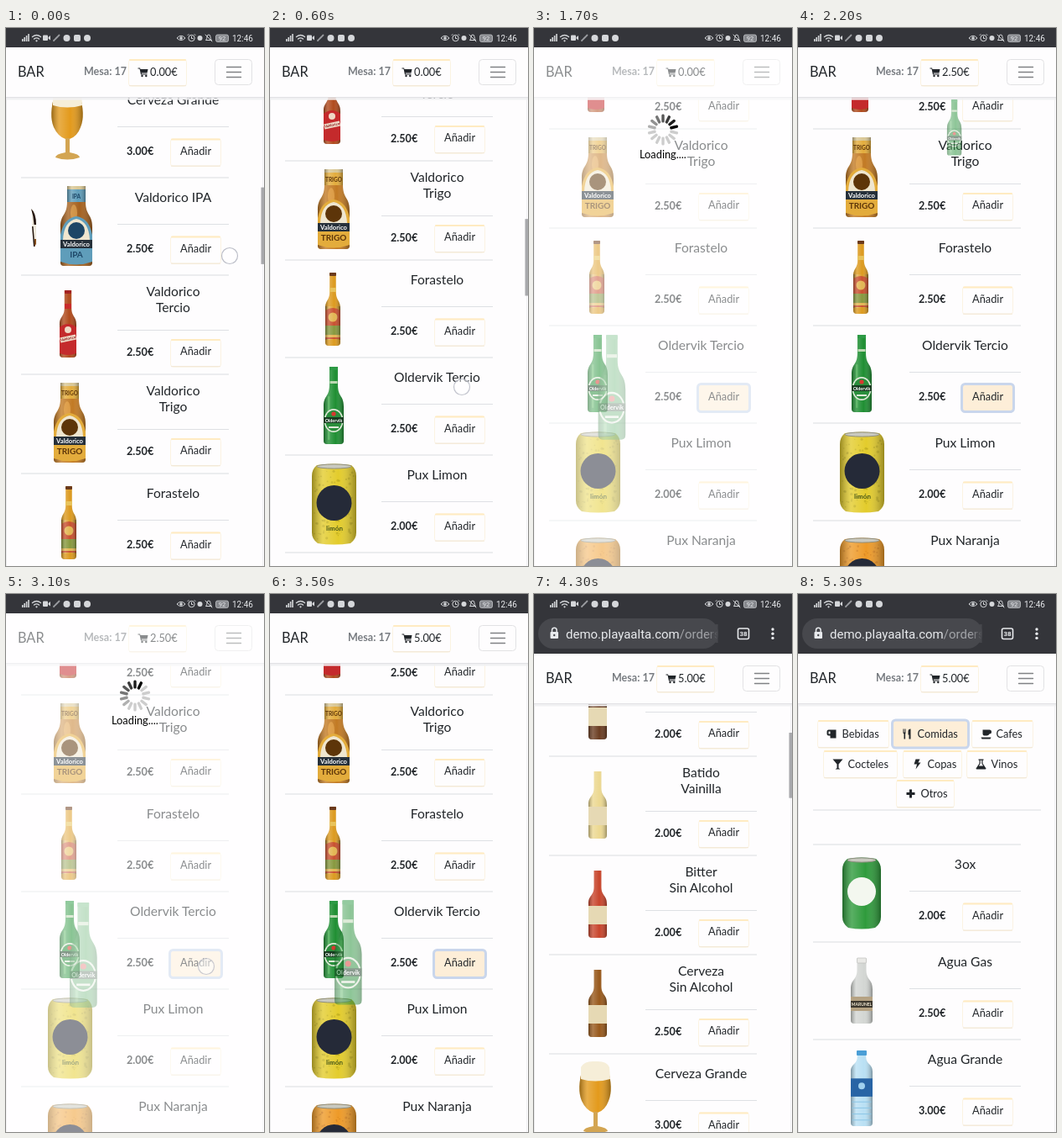
Write an HTML page that moves like this. It is 308 px wide and 640 px high and loops after 5400 ms.

```html
<!DOCTYPE html>
<html lang="es">
<head>
<meta charset="utf-8">
<title>Bar</title>
<style>
html, body { margin: 0; width: 100%; height: 100%; overflow: hidden; background: #fff; }
svg { display: block; width: 308px; height: 640px; }
text { font-family: Lato, "Open Sans", sans-serif; fill: #212529; }
.title { font-size: 15.6px; text-anchor: middle; }
.btn { font-size: 12.8px; }
.bold { font-size: 12.6px; font-weight: 700; }
.tag { font-weight: 700; text-anchor: middle; }
.sys { font-family: Roboto, sans-serif; fill: #e8eaed; }
</style>
</head>
<body>
<svg id="stage" viewBox="0 0 308 640"></svg>
<script>
const LOOP = 5400, STEP = 100;
const PAPER = '#fefdfe', BAR = '#34353a', PILL = '#47484d';

// ---------- drawing helpers ----------
const rect = (x, y, w, h, fill, more = '') =>
  `<rect x="${x}" y="${y}" width="${w}" height="${h}" fill="${fill}" ${more}/>`;
const circle = (x, y, r, fill, more = '') =>
  `<circle cx="${x}" cy="${y}" r="${r}" fill="${fill}" ${more}/>`;
const oval = (x, y, rx, ry, fill, more = '') =>
  `<ellipse cx="${x}" cy="${y}" rx="${rx}" ry="${ry}" fill="${fill}" ${more}/>`;
const path = (d, fill, more = '') => `<path d="${d}" fill="${fill}" ${more}/>`;
const line = (d, color, width = 1) =>
  path(d, 'none', `stroke="${color}" stroke-width="${width}" stroke-linecap="round"`);
const text = (x, y, s, cls, more = '') => `<text x="${x}" y="${y}" class="${cls}" ${more}>${s}</text>`;
const tag = (x, y, s, size, fill) => text(x, y, s, 'tag', `style="font-size:${size}px;fill:${fill}"`);
const group = (id, body, more = '') => `<g id="${id}" ${more}>${body}</g>`;

let seed = 7;
const random = () => (seed = seed * 16807 % 2147483647) / 2147483647;

function button(x, y, w, h, id) {
  const ring = id ? rect(x - 1.5, y - 1, w + 3, h + 2, '#fdeed8',
    `id="${id}" rx="4" stroke="#c9d6ec" stroke-width="3" visibility="hidden"`) : '';
  return rect(x - .5, y - .5, w + 1, h + 1.5, PAPER, 'rx="3" stroke="#fbf3e2"') +
    rect(x, y - 1, w, 2, '#ffebc2', 'rx="1"') +
    rect(x, y + h, w, 1.2, '#f3e9d8', 'rx=".6"') + ring;
}

// `top` and `low` bound the shoulder as parts of the height
function bottle(x, y, w, h, color, neck = .4, top = .24, low = .5) {
  const c = x + w / 2, n = w * neck / 2, r = x + w, b = y + h;
  const at = k => y + h * (top + (low - top) * k);
  const d = `M${c - n} ${y}H${c + n}V${at(0)}C${c + n} ${at(.55)} ${r} ${at(.45)} ${r} ${at(1)}` +
    `V${b - 4}Q${r} ${b} ${r - 4} ${b}H${x + 4}Q${x} ${b} ${x} ${b - 4}V${at(1)}` +
    `C${x} ${at(.45)} ${c - n} ${at(.55)} ${c - n} ${at(0)}Z`;
  return path(d, color) + path(d, 'url(#shade)');
}

function can(x, y, w, h, color, speck) {
  const r = x + w, b = y + h;
  const d = `M${x + 6} ${y + 1}Q${x + w / 2} ${y - 2} ${r - 6} ${y + 1}Q${r} ${y + 6} ${r} ${y + 14}V${b - 14}` +
    `Q${r} ${b - 6} ${r - 7} ${b - 1}Q${x + w / 2} ${b + 2} ${x + 7} ${b - 1}Q${x} ${b - 6} ${x} ${b - 14}V${y + 14}Q${x} ${y + 6} ${x + 6} ${y + 1}Z`;
  const specks = speck ? Array.from({ length: 90 }, () =>
    circle((x + 3 + random() * (w - 6)).toFixed(1), (y + 8 + random() * (h - 14)).toFixed(1), (.6 + random()).toFixed(1), speck, 'opacity=".6"')).join('') : '';
  return path(d, color) + specks + path(d, 'url(#shade)') +
    oval(x + w / 2, y + 2.5, w / 2 - 6, 2.6, '#c9c9c0', 'stroke="#8f8f80"');
}

// ---------- products, drawn relative to the top of their row ----------
const bigBeer = (x, shell, label, ink, word) =>
  bottle(x, 10, 38, 95, shell, .58, .2, .52) +
  oval(x + 16, 42, 4, 10, '#f0b45c', 'opacity=".55"') +
  rect(x + 8, 10, 22, 19, label) + rect(x + 8, 10, 22, 4, '#d9c795') +
  rect(x + 8, 10, 22, 19, 'url(#shade)') + tag(x + 19, 24.5, word, 6.5, ink) +
  path(`M${x} 68Q${x + 4} 48 ${x + 19} 46Q${x + 34} 48 ${x + 38} 68V100Q${x + 19} 107 ${x} 100Z`, label) +
  path(`M${x + 3} 74Q${x + 4} 52 ${x + 19} 49Q${x + 34} 52 ${x + 35} 74Z`, '#efe6cf') +
  circle(x + 19, 63, 10, ink) +
  rect(x, 74, 38, 10, '#26303a') + tag(x + 19, 81.5, 'Valdorico', 7.6, '#fff') +
  tag(x + 19, 95, word, 10, ink);

const longneck = bottle(64, 11, 24, 92, '#1f8f33', .42, .24, .52) +
  rect(71, 11, 10, 4, '#2d9a45', 'rx="1"') + rect(71.5, 28, 9, 3, '#bcd8b2') +
  rect(69, 46, 2.5, 52, '#8ada86', 'opacity=".4" rx="1"') +
  oval(76, 75, 11.5, 14, '#dfe9d8') + oval(76, 75, 10, 12.3, '#2a8e3c') +
  circle(76, 67, 2.6, '#d8382f') + rect(64, 71, 24, 7, '#173c20') + tag(76, 76.6, 'Oldervik', 5.4, '#fff') +
  rect(70, 82, 12, 2, '#dfe9d8');

const water = (y, h) => bottle(63, y, 26, h, '#b9e0f4', .4, .08, .28) +
  rect(70, y, 12, 6, '#4a9ed6', 'rx="1"') + rect(63, y + h * .37, 26, h * .24, '#2864a5') +
  circle(76, y + h * .47, 4, '#9fd0ee') +
  [.68, .76, .84, .92].map(k => line(`M65 ${y + h * k}h22`, '#8cc6e6')).join('');

const bowl = 'M58 17Q51 42 57 56Q62 67 71 70H76Q85 67 89 56Q95 42 88 17Z';
const glass = path(bowl, '#e39a1c') + path(bowl, 'url(#shade)') +
  path('M71 69H76V86Q88 88 88 92Q73 97 59 92Q59 88 71 86Z', '#d3a552') +
  path('M56 30V16Q60 8 73 9Q87 8 90 16L91 30Q73 35 56 30Z', '#f6eed8');

const small = c => bottle(65, 18, 22, 80, c) + rect(65, 60, 22, 22, '#e6d9b4');

const rows = [
  { name: '3ox', price: '2.00', art: can(53, 16, 46, 84, '#2f9b3c') + circle(76, 56, 17, '#f3f7ef') },
  { name: 'Agua Gas', price: '2.50', art: bottle(63, 19, 26, 78, '#d3d6d3', .42, .18, .48) +
    rect(70.5, 19, 11, 6, '#e9e9e6', 'rx="1" stroke="#b5b7b4" stroke-width=".6"') + rect(63, 65, 26, 17, '#b5a283') +
    rect(63, 70, 26, 8, '#3d382f') + tag(76, 76, 'MARUNEL', 5, '#f1e8d2') },
  { name: 'Agua Grande', price: '3.00', art: water(13, 90) },
  { name: 'Agua|Pequeña', price: '1.50', art: water(25, 70) },
  { name: 'Batido|Chocolate', price: '2.00', art: small('#6b3d22') },
  { name: 'Batido|Vainilla', price: '2.00', art: small('#ecd891') },
  { name: 'Bitter|Sin Alcohol', price: '2.00', art: small('#c8452c') },
  { name: 'Cerveza|Sin Alcohol', price: '2.50', art: small('#98591c') },
  { name: 'Cerveza Grande', price: '3.00', art: glass },
  { name: 'Valdorico IPA', price: '2.50', art: bigBeer(65, '#a5611f', '#5f9dba', '#1d4666', 'IPA') +
    path('M31 37Q36 43 36 56V78Q35 82 33 82Q32 70 31 60Z', '#efe9dd') +
    path('M30 37Q36 42 36 56H33.5Q33 46 30 37ZM31 58H32.5L34.5 82H33Z', '#24150e') + path('M34 73H36V79L34 82Z', '#87501f') },
  { name: 'Valdorico|Tercio', price: '2.50', art: bottle(64, 18, 20, 80, '#b04a1c', .42, .26, .52) +
    rect(70, 18, 8, 4, '#a32222', 'rx="1"') + rect(70, 34, 8, 6, '#c92c2c') +
    path('M64 62Q74 54 84 62V93Q74 97 64 93Z', '#c42a2c') + circle(74, 65, 4, '#efd9c6') +
    `<g transform="rotate(-12 74 75)">${rect(64.5, 72.5, 19, 6, '#efd9c6')}${tag(74, 77, 'Valdorico', 4.4, '#8d1d1f')}</g>` },
  { name: 'Valdorico|Trigo', price: '2.50', art: bigBeer(57, '#c27a24', '#e3ac3c', '#5d3509', 'TRIGO') },
  { name: 'Forastelo', price: '2.50', art: bottle(66, 15, 18, 87, '#dc9a1f', .42, .26, .5) +
    rect(71, 15, 8, 4, '#6b3a1c', 'rx="1"') + rect(71, 33, 8, 5, '#e8c35c') +
    path('M66 60Q75 54 84 60V94H66Z', '#c8502f') + rect(66, 78, 18, 11, '#87983e') +
    circle(75, 68, 5.5, '#e3b552') + rect(66, 89, 18, 3, '#e3b552') + rect(66, 55, 18, 40, 'url(#shade)') },
  { name: 'Oldervik Tercio', price: '2.50', art: longneck, id: 'pick' },
  { name: 'Pux Limon', price: '2.00', art: can(50, 11, 53, 95, '#e3cc2c', '#b7a51c') +
    circle(76.5, 57, 21, '#252a38') + tag(77, 90, 'limón', 8, '#4a5a1a') },
  { name: 'Pux Naranja', price: '2.00', art: can(50, 21, 53, 90, '#ee9a28', '#c9761a') + circle(76.5, 66, 21, '#252a38') },
];

function addRow(row, y) {
  const words = row.name.split('|'), two = words.length > 1, drop = two ? 6.5 : 0;
  row.h = two ? 118 : 116;
  const titles = words.map((w, i) => text(199.5, two ? 25 + i * 18.7 : 28.5, w, 'title')).join('');
  return `<g transform="translate(0 ${y})">${row.art}${titles}` +
    rect(133, two ? 65 : 55, 133, 1, '#dee0e4') +
    text(144, 89 + drop, row.price + '€', 'bold') +
    button(197, 70.5 + drop, 59, 31, row.id) + text(208, 88.5 + drop, 'Añadir', 'btn') +
    rect(18, row.h - .5, 248, 1, '#dcdde2') + '</g>';
}

// Twelve-unit icons
const dark = '#212529';
const icons = {
  beer: path('M4 1H11V11H4V8H2Q0 8 0 6V3Q0 1 2 1ZM2 3V6H4V3Z', dark),
  fork: path('M1 0H2V4H3V0H4V5L3.6 6V12H2V6L1 5ZM8 12V7H7V3Q7 0 10 0V12Z', dark),
  cup: path('M2 1H10Q12.5 1 12.5 3.5T10 6Q9 8 7 8H4Q2 8 2 6ZM0 10H12L11 12H1Z', dark),
  cocktail: path('M0 0H12L7 6V10.5L9 12H3L5 10.5V6Z', dark),
  bolt: path('M4 0H9L7 4H10L4 12L5.5 6H2Z', dark),
  flask: path('M3 0H9V1.2H8V5L12 11Q12 12 11 12H1Q0 12 0 11L4 5V1.2H3ZM5.2 1.2V5L3.5 8H8.5L6.8 5V1.2Z', dark, 'fill-rule="evenodd"'),
  plus: path('M4.5 1H7.5V4.5H11V7.5H7.5V11H4.5V7.5H1V4.5H4.5Z', dark),
  cart: path('M0 1H2.6L3 2.4H12L11 7H4.2L4.5 8H11V9H3.5L2 2H0Z', dark) + circle(5, 10.5, 1.2, dark) + circle(9.8, 10.5, 1.2, dark),
};
const icon = (name, x, y) => `<g transform="translate(${x} ${y})">${icons[name]}</g>`;

// Categories sit above the first row, whose top is y = 0
const cats = [
  ['Bebidas', 'beer', 24, -147, 84], ['Comidas', 'fork', 114, -147, 88, 'food'], ['Cafes', 'cup', 208, -147, 72],
  ['Cocteles', 'cocktail', 31, -111, 87], ['Copas', 'bolt', 126, -111, 69], ['Vinos', 'flask', 202, -111, 71],
  ['Otros', 'plus', 118, -76, 68],
];
let list = cats.map(([name, ic, x, y, w, id]) =>
  button(x, y, w, 31, id) + icon(ic, x + 10.5, y + 9.5) + text(x + 28.5, y + 20, name, 'btn')).join('') +
  rect(18, -41.5, 272, 1, '#dcdde2') + rect(18, -.5, 248, 1, '#dcdde2');
let end = 0;
const tops = rows.map(row => {
  const y = end;
  list += addRow(row, y);
  end += row.h;
  return y;
});

const header = rect(0, 23, 308, 59, PAPER) + rect(0, 82, 308, 1.5, '#e2e2e5') + rect(0, 83.5, 308, 2, '#f1f1f3') +
  text(14, 58, 'BAR', '', 'font-size="16.3"') +
  text(93, 56, 'Mesa: 17', 'bold', 'style="fill:#777b80;font-size:12.5px"') +
  button(147, 38, 68, 30) + icon('cart', 157.5, 46.5) + text(172, 57, '', 'btn', 'id="total"') +
  rect(249.5, 37.5, 44, 30, PAPER, 'rx="4" stroke="#e2e2e4"') +
  line('M263.5 46.5h17M263.5 52.5h17M263.5 58.5h17', '#808285', 1.4);

const urlBar = rect(0, 23, 308, 48, BAR) + rect(5, 29, 215, 36, PILL, 'rx="18"') +
  rect(19.5, 45, 9.5, 8, '#e8eaed', 'rx="1"') + path('M21.5 45V43a2.8 2.8 0 0 1 5.6 0V45', 'none', 'stroke="#e8eaed" stroke-width="1.5"') +
  circle(24.2, 49, 1.2, PILL) +
  `<g clip-path="url(#field)">${text(38, 52.5, 'demo.playaalta.com<tspan fill="#a2a4a8">/orders</tspan>', 'sys', 'font-size="15"')}</g>` +
  rect(206, 36, 13.5, 22, 'url(#fade)') +
  rect(243.5, 41, 13, 12.5, 'none', 'rx="2" stroke="#e8eaed" stroke-width="1.6"') +
  text(250, 50.2, '38', 'sys', 'font-size="8" font-weight="700" text-anchor="middle"') +
  [42, 47.2, 52.4].map(y => circle(285, y, 1.7, '#e8eaed')).join('');

const pale = '#d5d7da';
const statusBar = rect(0, 0, 308, 23, BAR) +
  [0, 1, 2, 3].map(i => rect(19 + i * 2.4, 13 - i * 2, 1.6, 3 + i * 2, pale)).join('') +
  line('M31.5 10.5Q36.5 6.5 41.5 10.5M33.5 13Q36.5 10.8 39.5 13', pale, 1.4) + circle(36.5, 15.3, 1.1, pale) +
  rect(44, 8.5, 6, 6.5, pale, 'rx="1"') + path('M50.5 11L53 9V14.5L50.5 12.5Z', pale) +
  line('M58 14l-1 1M59 13l3-3M62.5 9.5l1-1', '#9a9ca0', 1.8) +
  circle(72.5, 12, 4, pale) + rect(81, 8, 8, 8, pale, 'rx="2"') + circle(97, 12, 4, pale) +
  path('M204 12Q209 6.5 214 12Q209 17 204 12Z', 'none', `stroke="${pale}"`) + circle(209, 12, 1.8, pale) +
  circle(221.5, 12, 3.7, 'none', `stroke="${pale}"`) + line('M221.5 10V12.5H223M218 7.5l-1 1M225 7.5l1 1', pale) +
  circle(231.5, 12, 3, pale) +
  path('M238.5 14.5Q240 13 240 10.5T242 8T244 10.5T245.5 14.5Z', 'none', `stroke="${pale}"`) + line('M238 8l8 8', pale) +
  rect(250.5, 8, 15, 8.5, '#85878c', `rx="2" stroke="${pale}" stroke-width=".7"`) +
  text(258, 15, '92', 'sys', 'font-size="7.5" text-anchor="middle"') +
  text(270, 15.8, '12:46', 'sys', 'font-size="10"');

const TICKS = 14;
const spinner = Array.from({ length: TICKS }, (_, i) => {
  const g = Math.round(205 * Math.min(1, i / 7));
  return rect(-1.7, -18.5, 3.4, 10, `rgb(${g},${g},${g})`, `rx="1.5" transform="rotate(${(1 - i) * 360 / TICKS})"`);
}).join('');

const stop = (o, c, a) => `<stop offset="${o}" stop-color="${c}" stop-opacity="${a}"/>`;
document.getElementById('stage').innerHTML =
  `<defs><linearGradient id="shade">${stop(0, '#000', .34)}${stop(.25, '#fff', .2)}${stop(.6, '#fff', 0)}${stop(1, '#000', .34)}</linearGradient>` +
  `<linearGradient id="fade">${stop(0, PILL, 0)}${stop(1, PILL, 1)}</linearGradient>` +
  `<clipPath id="field">${rect(38, 30, 181, 34, '#000')}</clipPath></defs>` +
  rect(0, 0, 308, 640, PAPER) + rect(0, 23, 1, 617, '#ececee') + rect(306, 23, 1, 617, '#f1f1f3') +
  group('list', list) + group('thumb', rect(304.5, 0, 3.5, 1, '#a8a9ac')) +
  group('header', header) + group('flyer', `<g transform="translate(-64 -11)">${longneck}</g>`, 'opacity=".5"') +
  group('loading', rect(0, 23, 308, 617, '#fff', 'opacity=".47"') + `<g transform="translate(154 121)">${group('spin', spinner)}</g>` +
    text(126, 155, 'Loading....', 'btn', 'style="fill:#000"')) +
  group('dot', circle(0, 0, 9.5, '#fff', 'fill-opacity=".6" stroke="#bcbec8" stroke-width="1.2"')) +
  group('url', urlBar) + statusBar;

// ---------- motion ----------
const el = id => document.getElementById(id);
const set = (id, name, value) => el(id).setAttribute(name, value);
const show = (id, on) => set(id, 'visibility', on ? 'visible' : 'hidden');
const mix = (a, b, k) => a + (b - a) * k;
const clamp = x => Math.max(0, Math.min(1, x));
const outQuad = k => k * (2 - k);
const inOutExpo = k => k <= 0 ? 0 : k >= 1 ? 1 : k < .5 ? 2 ** (20 * k - 10) / 2 : 1 - 2 ** (10 - 20 * k) / 2;

function track(keys, t) {
  if (t <= keys[0][0]) return keys[0][1];
  for (let i = 1; i < keys.length; i++) {
    const [a, from] = keys[i - 1], [b, to, ease = k => k] = keys[i];
    if (t <= b) return mix(from, to, ease((t - a) / (b - a)));
  }
  return keys[keys.length - 1][1];
}

const START = 178 - tops[9], REST = START - 292;
const scroll = [[0, START], [600, START - 254, outQuad], [1300, REST, outQuad], [3600, REST], [3700, START - 265],
  [3900, START - 57], [4100, START + 170], [4500, START + 800], [4800, 298, outQuad]];
const bar = [[3650, 0], [3850, 1]];
const thumbFade = [[1300, 1], [1600, 0], [3600, 0], [3700, 1], [4900, 1], [5200, 0]];

// from, to, x0, y0, x1, y1, opacity
const touches = [
  [0, 100, 267, 271, 267, 250, 1], [500, 800, 228, 436, 231, 409, .9], [1400, 1500, 244, 443, 244, 443, .4],
  [3000, 3200, 239, 443, 239, 443, .8], [3700, 4000, 255, 290, 262, 570, 1], [5100, 5200, 160, 167, 160, 167, .8],
];
// shown, flight start
const flights = [[1500, 1515], [3100, 3284]];
const waits = [[1500, 1900], [3100, 3500]];

function draw(t) {
  const y = track(scroll, t), b = track(bar, t), shift = 48 * b;
  set('list', 'transform', `translate(0 ${y.toFixed(2)})`);
  set('header', 'transform', `translate(0 ${shift})`);
  set('url', 'transform', `translate(0 ${shift - 48})`);
  show('url', b > 0);

  const view = 23 + shift, size = 640 - view, ratio = size / 4170;
  set('thumb', 'transform', `translate(0 ${view + (view + 227 - y) * ratio}) scale(1 ${size * ratio})`);
  set('thumb', 'opacity', track(thumbFade, t));

  el('total').textContent = (t < 1900 ? '0.00' : t < 3500 ? '2.50' : '5.00') + '€';
  show('pick', t >= 1500 && t < 5200);
  show('food', t >= 5200);

  const wait = waits.find(([a, z]) => t >= a && t < z);
  show('loading', wait);
  if (wait) set('spin', 'transform', `rotate(${(t - wait[0]) / 100 * 360 / TICKS})`);

  const flight = flights.find(([a, go]) => t >= a && t < go + 1200);
  show('flyer', flight);
  if (flight) {
    const k = inOutExpo((t - flight[1]) / 1000);
    const shrink = 1 - clamp((t - flight[1] - 1000) / 200);
    const s = mix(125, 64, k) / 92 * shrink;
    set('flyer', 'transform', `translate(${mix(76, 182, k)} ${mix(367, 74, k) + y - REST}) scale(${s})`);
  }

  const touch = touches.find(([a, z]) => t >= a && t < z);
  show('dot', touch);
  if (touch) {
    const [a, z, x0, y0, x1, y1, alpha] = touch, k = (t - a) / (z - a);
    set('dot', 'transform', `translate(${mix(x0, x1, k)} ${mix(y0, y1, k)})`);
    set('dot', 'opacity', alpha);
  }
}

const t0 = performance.now();
function tick() {
  const t = (performance.now() - t0) % LOOP;
  draw(Math.floor(t / STEP) * STEP);
  requestAnimationFrame(tick);
}
tick();
</script>
</body>
</html>
```
